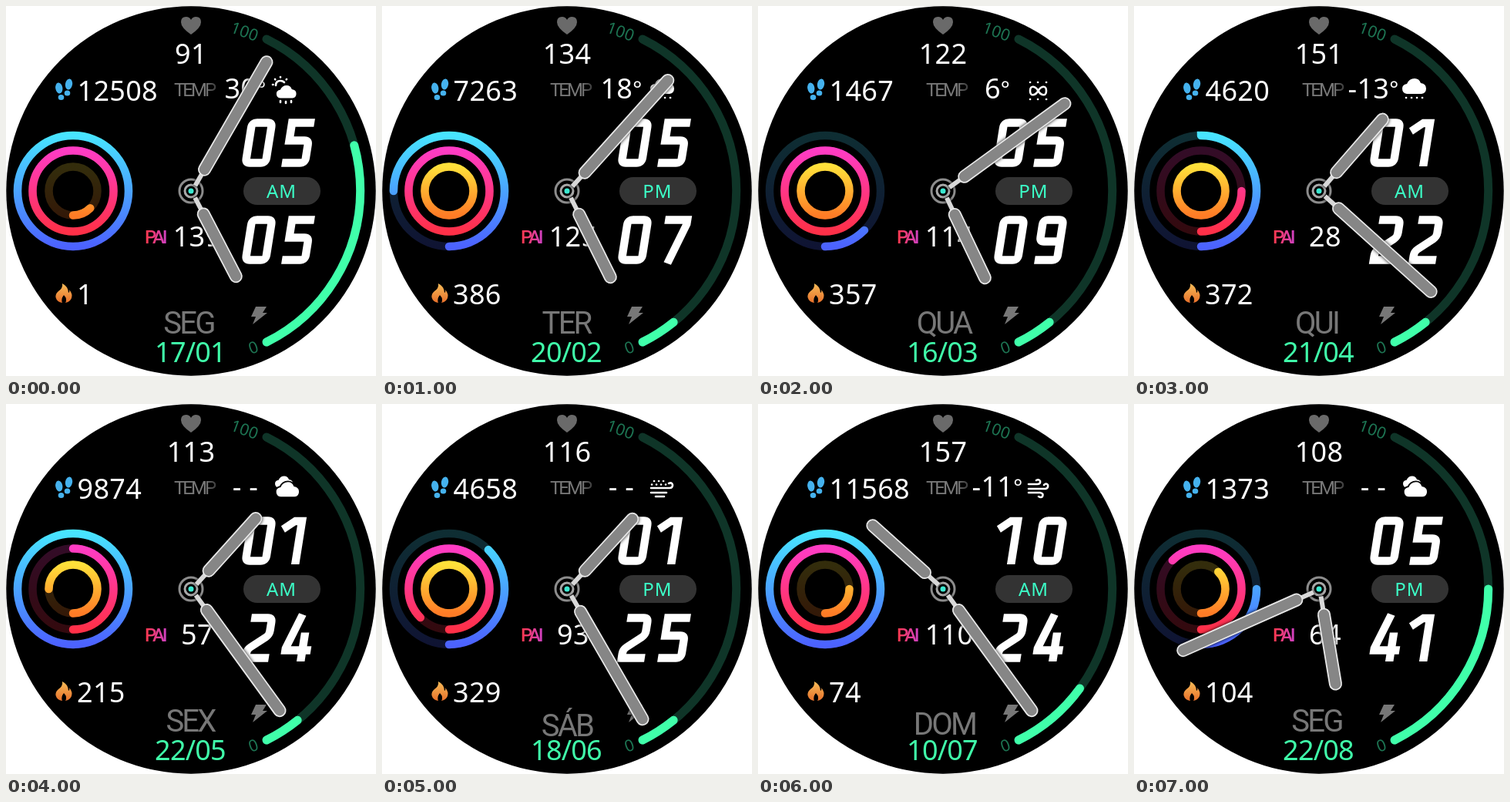
Animation, 480 px wide and 480 px high, one loop 8000 ms. Source, as an HTML page:

```html
<!DOCTYPE html>
<html lang="pt">
<head>
<meta charset="utf-8">
<style>
html, body { margin: 0; width: 100%; height: 100%; overflow: hidden; background: #fff; }
svg { display: block; width: 100vw; height: 100vh; }
path:not(.solid), circle.line { fill: none; stroke-linecap: round; }
.num { font: 36px "Noto Sans", sans-serif; letter-spacing: .3px; fill: #fff; }
.mid { text-anchor: middle; }
.label { font-family: Roboto, sans-serif; fill: #777; }
.scale { font: 21px "Noto Sans", sans-serif; fill: #1d7553; }
#digits path { stroke: #fff; stroke-width: 10.5; stroke-linecap: butt; }
#weather path:not(.solid) { stroke: #fff; stroke-width: 2.6; }
#weather .solid { fill: #fff; }
#weather .front { stroke: #000; stroke-width: 4; paint-order: stroke; }
.hand { filter: drop-shadow(0 0 2px #000); }
</style>
</head>
<body>
<svg viewBox="0 0 480 480">
  <defs>
    <linearGradient id="g0" x2="0" y2="1"><stop stop-color="#48e4ff"/><stop offset="1" stop-color="#4c62ff"/></linearGradient>
    <linearGradient id="g1" x2="0" y2="1"><stop stop-color="#ff3cc4"/><stop offset="1" stop-color="#ff3048"/></linearGradient>
    <linearGradient id="g2" x2="0" y2="1"><stop stop-color="#ffe03a"/><stop offset="1" stop-color="#ff7c26"/></linearGradient>
    <linearGradient id="pai"><stop stop-color="#ff3848"/><stop offset="1" stop-color="#d040c0"/></linearGradient>
    <linearGradient id="flame" x2="0" y2="1"><stop stop-color="#f6bc58"/><stop offset="1" stop-color="#e8702a"/></linearGradient>
    <linearGradient id="temp"><stop offset=".75" stop-color="#777"/><stop offset="1" stop-color="#383838"/></linearGradient>
  </defs>
  <circle cx="240" cy="240" r="239.700"/>

  <path class="solid" fill="#6a6a6a" d="M240 37Q227 28 227 21Q227 14 233.500 14Q238 14 240 18Q242 14 246.500 14Q253 14 253 21Q253 28 240 37Z"/>
  <g fill="#45b2ee">
    <ellipse cx="68.800" cy="106.500" rx="4.600" ry="7" transform="rotate(-10 68.800 106.500)"/>
    <ellipse cx="71.500" cy="118.500" rx="3.800" ry="3.600"/>
    <ellipse cx="81.500" cy="101.500" rx="4.600" ry="7" transform="rotate(10 81.500 101.500)"/>
    <ellipse cx="79.500" cy="113" rx="3.800" ry="3.600"/>
  </g>
  <path class="solid" fill="url(#flame)" d="M73 360Q81 364 81 372Q83 371 82 368Q87 374 85 379Q83 384 77 385Q80 380 75 375Q71 380 73 385Q66 384 64.500 378Q64 373 68 370Q74 366 73 360Z"/>
  <path class="solid" fill="#777" d="M324 390H338L333 398H339L320 413L324 403H318Z"/>
  <text class="label" x="218" y="117" style="font-size:24px;letter-spacing:-3px;fill:url(#temp)">TEMP</text>
  <text class="label" x="180" y="308" style="font-size:24px;font-weight:500;letter-spacing:-3.200px;fill:url(#pai)">PAI</text>

  <g id="rings" stroke-width="10.500"></g>
  <g stroke-width="11">
    <path d="M338 436A219.500 219.500 0 0 0 338 43" stroke="#0f3528"/>
    <path id="battery" pathLength="127" d="M338 436A219.500 219.500 0 0 0 338 43" stroke="#40ffaa"/>
  </g>
  <text class="scale mid" transform="translate(307 40) rotate(20)">100</text>
  <text class="scale mid" transform="translate(323.500 450) rotate(-20)">0</text>

  <text id="pulse" class="num mid" x="240" y="75"></text>
  <text id="steps" class="num" x="92.500" y="123"></text>
  <text class="num mid" x="310.500" y="120"><tspan id="degrees"></tspan><tspan id="unit" dy="-3.500" font-size="28"></tspan></text>
  <text id="score" class="num mid" x="248" y="312"></text>
  <text id="calories" class="num" x="92" y="387"></text>
  <text id="day" class="label mid" style="font-size:40px;letter-spacing:-2.800px"></text>
  <text id="date" class="num mid" x="239" y="462" style="fill:#40ffaa;letter-spacing:-.8px"></text>
  <g id="weather"></g>

  <g id="digits"></g>
  <rect x="308" y="222" width="100" height="36" rx="18" fill="#333"/>
  <text id="half" class="mid" x="357.500" y="249" style="font:24px 'Noto Sans',sans-serif;letter-spacing:1px;fill:#3cffc8"></text>

  <circle class="line" cx="240" cy="240" r="15" stroke="#8c8c8c" stroke-width="3"/>
  <circle class="line" cx="240" cy="240" r="8" stroke="#a8a8a8" stroke-width="3"/>
  <circle cx="240" cy="240" r="3.500" fill="#3ce8d0"/>
  <g id="hands" transform="translate(1 .7)"></g>
</svg>
<script>
const $ = id => document.getElementById(id);

// pulse, steps, temperature, weather, hour, minute, half, battery sweep, ring eighths, score, calories, day, day x, day y, date
const screens = [
  [91, 12508, '30°', 'showers', 5, 5, 'AM', 79, [8, 8, 1], 139, 1, 'SEG', 237, 425, '17/01'],
  [134, 7263, '18°', 'snow', 5, 7, 'PM', 12.5, [6, 8, 8], 125, 386, 'TER', 239, 425, '20/02'],
  [122, 1467, '6°', 'haze', 5, 9, 'PM', 12.5, [1, 8, 8], 114, 357, 'QUA', 241, 425, '16/03'],
  [151, 4620, '-13°', 'snow', 1, 22, 'AM', 12.5, [4, 2, 8], 28, 372, 'QUI', 237, 425, '21/04'],
  [113, 9874, '- -', 'cloud', 1, 24, 'AM', 12.5, [8, 4, 6], 57, 215, 'SEX', 239, 425, '22/05'],
  [116, 4658, '- -', 'dust', 1, 25, 'PM', 12.5, [3, 7, 8], 93, 329, 'SÁB', 240, 431, '18/06'],
  [157, 11568, '-11°', 'wind', 10, 24, 'AM', 27.4, [8, 8, 2], 110, 74, 'DOM', 242, 429, '10/07'],
  [108, 1373, '- -', 'cloud', 5, 41, 'PM', 63.4, [2, 5, 3], 64, 104, 'SEG', 237, 425, '22/08']
];

const glyphs = {
  0: 'M-8-26H7Q13-26 13-20V20Q13 26 7 26H-7Q-13 26-13 20V-20Q-13-26-7-26Z',
  1: 'M-18-15L-4-25.500H5V30.500',
  2: 'M-14-26H7Q13-26 13-20V-9Q13-4 9-1L-9 12Q-13 15-13 20V26H17',
  4: 'M1-30.500L-14 13V16H19M8-7V30.500',
  5: 'M17-26H-12V-3H7Q13-3 13 3V20Q13 26 7 26H-17',
  7: 'M-16-26H13V-20L-4 30.500',
  9: 'M13 2H-7Q-13 2-13-4V-20Q-13-26-7-26H7Q13-26 13-20V20Q13 26 7 26H-16'
};

const solid = (d, front) => `<path class="solid ${front ? 'front' : ''}" d="${d}"/>`;
const line = d => `<path d="${d}"/>`;
const cloud = 'M354 114Q348 113 348 107Q348 102 354 101Q357 94 364 94Q370 94 372 100Q379 101 379 107Q379 113 373 114Z';
const dots = (y, ...xs) => line(xs.map(x => `M${x} ${y}h.1`).join(''));
const icons = {
  showers: line('M350 103Q350 97 356 97Q359 97 361 99M356 92v.5M349 95l.3.3M346 102h.5M364 95l-.3.3') +
    `<g transform="translate(62 25) scale(.83)">${solid(cloud)}</g>` + line('M356 123v2M363 124v2M370 123v2'),
  haze: line('M363.500 110C360 104 353 102 353 110S360 116 363.500 110S374 102 374 110S367 116 363.500 110') +
    dots(99, 353, 363, 374) + dots(121, 353, 363, 374),
  snow: solid(cloud) + dots(119, 353, 360, 367, 374),
  dust: line('M349 109H373Q377 109 377 105Q376 101 372 103M349 115H369M355 120H366') +
    dots(100, 353, 359, 365) + dots(104.5, 350, 356, 362, 368),
  wind: line('M351 104H362Q367 104 366 100Q364 97 361 99M351 110H373Q377 109 376 105Q374 102 371 105M351 115H366Q371 116 369 120Q367 122 364 120'),
  cloud: `<g transform="translate(88 23) scale(.75)">${solid(cloud)}</g>` +
    `<g transform="translate(20 12) scale(.95)">${solid(cloud, true)}</g>`
};

$('rings').innerHTML = [72, 52.5, 31.5].map((r, i) => {
  const d = `M87 ${240 + r}a${r} ${r} 0 0 0 0 ${-2 * r}a${r} ${r} 0 0 0 0 ${2 * r}`;
  return `<path d="${d}" stroke="url(#g${i})" opacity=".2"/><path class="ring" d="${d}" stroke="url(#g${i})" pathLength="8"/>`;
}).join('');

$('hands').innerHTML = [124, 194].map(length => {
  const bar = `M240 207V${240 - length}`;
  return `<g class="hand"><g><path d="M240 231V207" stroke="#d8d8d8" stroke-width="6" style="stroke-linecap:butt"/>` +
    `<path d="${bar}" stroke="#e8e8e8" stroke-width="17"/><path d="${bar}" stroke="#868686" stroke-width="13.500"/></g></g>`;
}).join('');
const [hourHand, minuteHand] = document.querySelectorAll('.hand > g');
const rings = document.querySelectorAll('.ring');

const bigNumber = (value, y) => [...String(value).padStart(2, '0')].map((c, i) => {
  const x = i ? (c === '1' ? 375 : 379) : 328;
  return `<path d="${glyphs[c]}" transform="translate(${x} ${y}) skewX(-9)"/>`;
}).join('');

function show([pulse, steps, temperature, weather, hour, minute, half, battery, eighths, score, calories, day, dayX, dayY, date]) {
  const [degrees, unit] = temperature.split(/(?=°)/);
  const texts = { pulse, steps, degrees, unit, half, score, calories, day, date };
  for (const id in texts) $(id).textContent = texts[id] ?? '';
  $('day').setAttribute('x', dayX);
  $('day').setAttribute('y', dayY);
  $('weather').innerHTML = icons[weather];
  $('digits').innerHTML = bigNumber(hour, 177.5) + bigNumber(minute, 303.5);
  $('battery').style.strokeDasharray = `${battery} 200`;
  rings.forEach((ring, i) => ring.style.strokeDasharray = eighths[i] < 8 ? `${eighths[i]} 9` : 'none');
  hourHand.setAttribute('transform', `rotate(${hour * 30 + minute / 2} 240 240)`);
  minuteHand.setAttribute('transform', `rotate(${minute * 6} 240 240)`);
}

let current = -1;
const start = performance.now();
function tick() {
  const index = Math.floor((performance.now() - start) / 1000) % screens.length;
  if (index !== current) show(screens[current = index]);
  requestAnimationFrame(tick);
}
tick();
</script>
</body>
</html>
```
